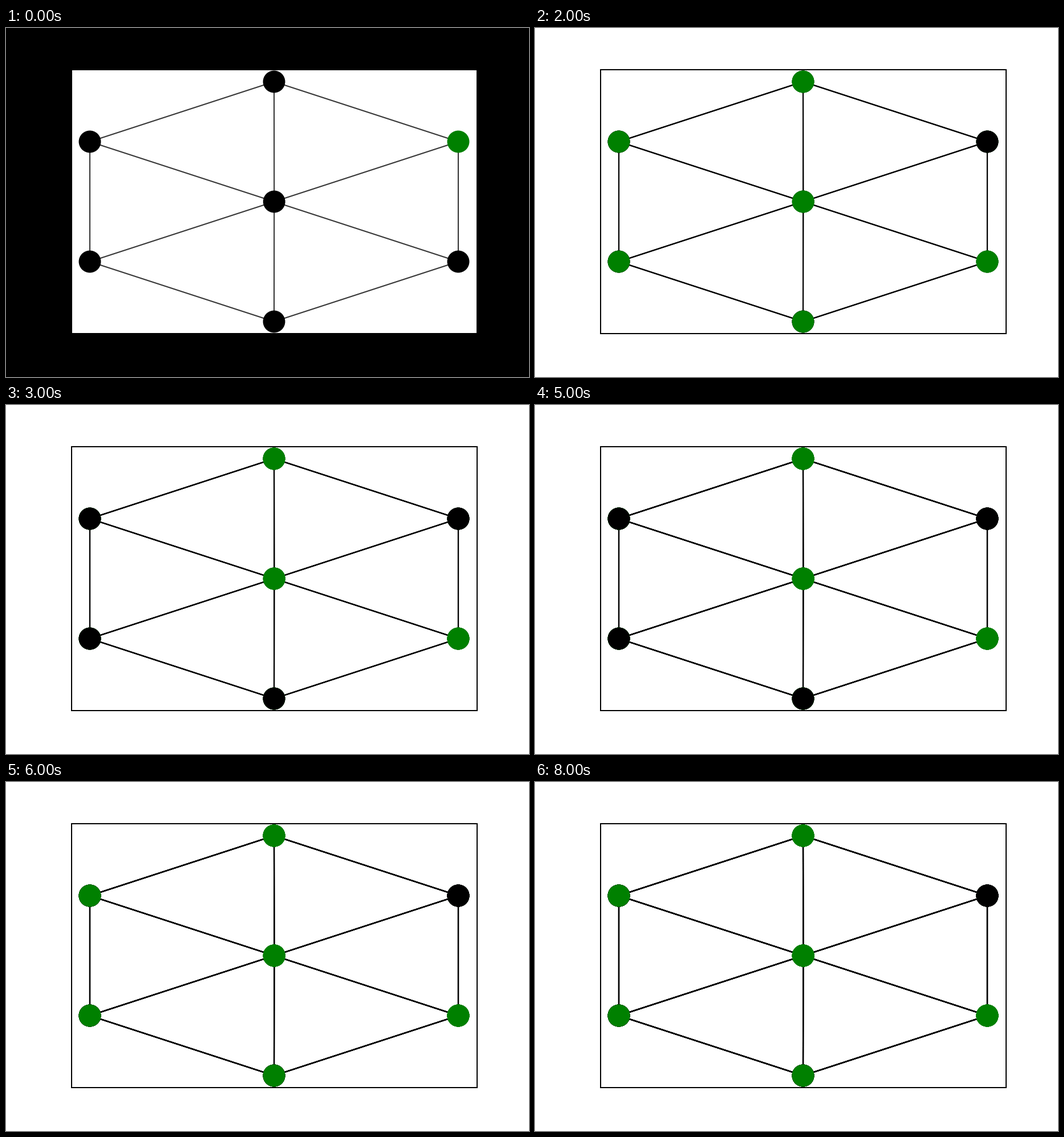
Animation of 917 by 611 pixels, one loop 9 s. Source, as a matplotlib script:

```python
import numpy as np
import matplotlib.pyplot as plt
from matplotlib.animation import FuncAnimation
from matplotlib.collections import LineCollection
from matplotlib.patches import Rectangle

W, H, DPI = 917, 611, 64
PT = 72 / DPI  # points per pixel
STEPS = 9
LINE = 2.12
NODE = 36.75

fig = plt.figure(figsize=(W / DPI, H / DPI), dpi=DPI)
ax = fig.add_axes([0, 0, 1, 1])
ax.set(xlim=(0, W), ylim=(H, 0))
ax.axis("off")
ax.add_patch(Rectangle((115, 73), 711, 462, fc="white", ec="black",
                       lw=2 * PT, zorder=0))

# Wheel graph: six rim nodes counter-clockwise from the upper right, then the hub
angle = np.radians(30 + 60 * np.arange(6))
rim = np.column_stack([470 + 323 / np.cos(np.pi / 6) * np.cos(angle),
                       304 - 210 * np.sin(angle)])
nodes = np.vstack([rim, [470.2, 304]])
edges = [(i, (i + 1) % 6) for i in range(6)] + [(i, 6) for i in range(6)]
segments = [nodes[list(e)] for e in edges]


def lit(step):
    """Nodes the signal has reached at this step."""
    if step == 0:
        return {0}
    near = {1, 5, 6}
    return near if step % 2 else near | {2, 3, 4}


def make_layer(step):
    on = lit(step)
    colors = ["green" if i in on else "black" for i in range(len(nodes))]
    lines = LineCollection(segments, colors="black", alpha=0.78,
                           linewidths=LINE * PT, zorder=1)
    ax.add_collection(lines, autolim=False)
    dots = ax.scatter(*nodes.T, s=(NODE * PT) ** 2, c=colors,
                      edgecolors=colors, linewidths=LINE * PT,
                      zorder=2 + step / STEPS)
    return lines, dots


layers = [make_layer(k) for k in range(STEPS)]
ax.set(xlim=(0, W), ylim=(H, 0))


def update(step):
    # Each step is painted over the earlier ones, so the edges darken
    fig.set_facecolor("black" if step == 0 else "white")
    for k, layer in enumerate(layers):
        for artist in layer:
            artist.set_visible(k <= step)
    return []


anim = FuncAnimation(fig, update, frames=STEPS, init_func=lambda: update(0),
                     interval=1000, repeat=True, repeat_delay=0, blit=False)
plt.show()
```
